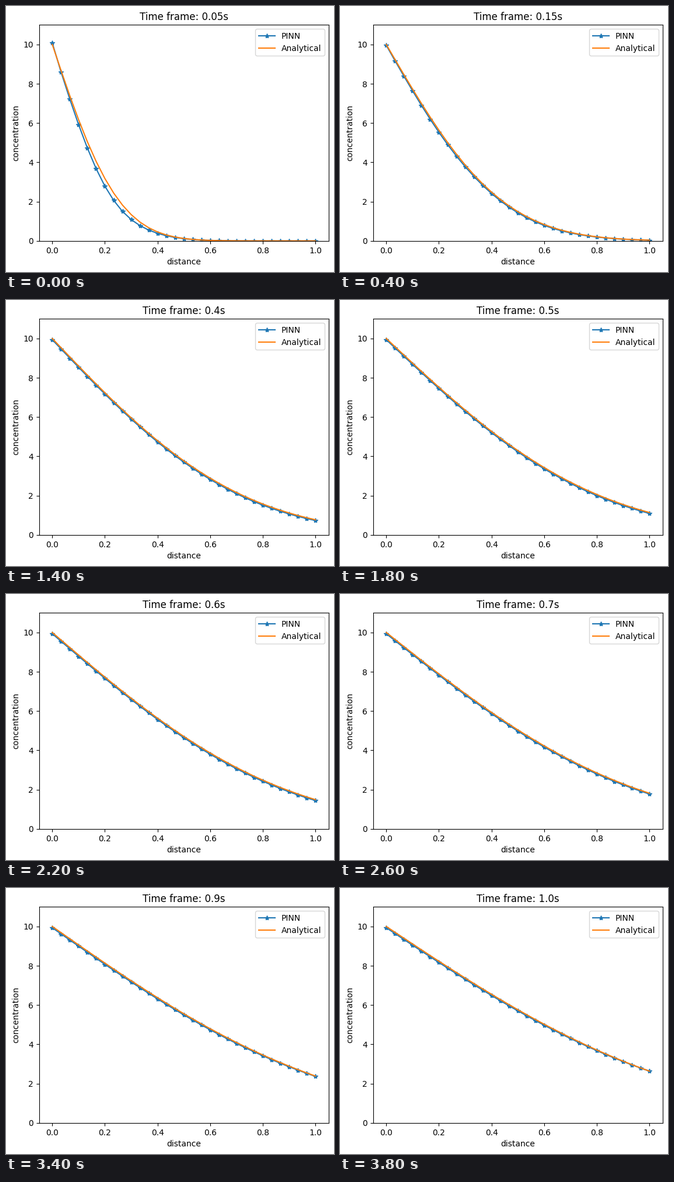
Recreate the animation shown at these times as a matplotlib script. Size 562x455 px, loop 4000 ms.

```python
import math

import matplotlib.pyplot as plt
import numpy as np
from matplotlib.animation import FuncAnimation

W, H, DPI = 562, 455, 100
FRAMES, INTERVAL = 20, 200
DT = 0.05
C0, DIFFUSIVITY = 10, 0.4

x = np.linspace(0, 1, 31)


def analytical(t):
    """Diffusion into a half-space held at C0 on its boundary."""
    scale = 2 * math.sqrt(DIFFUSIVITY * t)
    return np.array([C0 * math.erfc(v / scale) for v in x])


def predicted(t):
    """Analytical curve with a small bias and an early error that dies out."""
    exact = analytical(t)
    bias = -0.065 * np.tanh(exact) * (1 - (x * t) ** 3)
    dip = -0.325 * np.exp(-((x - 0.2) / 0.14) ** 2)
    edge = 0.19 * np.exp(-x / 0.03)
    return exact + bias + (dip + edge) * math.exp(1 - t / DT)


# The tiny extra height keeps the pixel count from truncating to 454
fig = plt.figure(figsize=(W / DPI, (H + 0.01) / DPI), dpi=DPI)
ax = fig.add_axes([56.75 / W, 53.2 / H, 496 / W, 369.6 / H])
pinn_line, = ax.plot(x, predicted(DT), marker="*", label="PINN")
exact_line, = ax.plot(x, analytical(DT), label="Analytical")
ax.set_xlim(-0.05, 1.05)
ax.set_ylim(0, 11)
ax.set_xlabel("distance")
ax.set_ylabel("concentration")
ax.legend(loc="upper right")
title = ax.set_title("")


def update(i):
    t = round((i + 1) * DT, 2)
    pinn_line.set_ydata(predicted(t))
    exact_line.set_ydata(analytical(t))
    title.set_text(f"Time frame: {t}s")
    return pinn_line, exact_line, title


anim = FuncAnimation(fig, update, frames=FRAMES, interval=INTERVAL,
                     repeat=True, repeat_delay=0)
plt.show()
```
